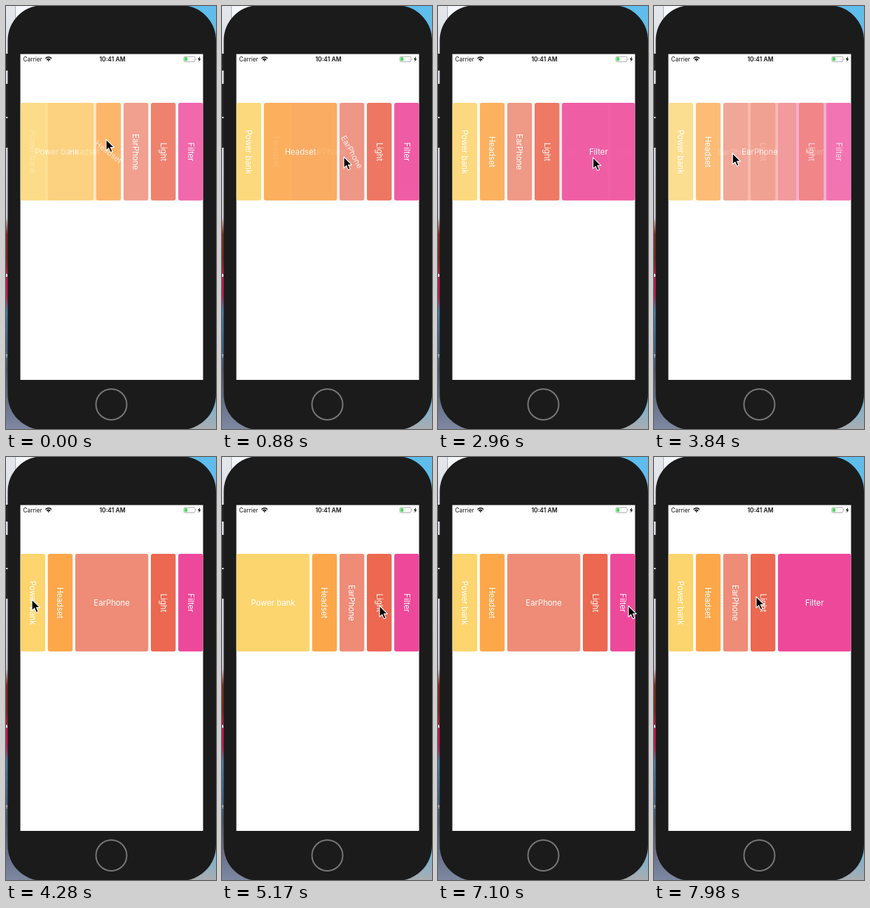
These frames come from a looping animation (300x603 px, 8000 ms). An HTML page:

```html
<!DOCTYPE html>
<html lang="en">
<head>
<meta charset="utf-8">
<title>Expanding cards</title>
<style>
  html, body { margin: 0; width: 100%; height: 100%; overflow: hidden; background: #e6eaf0; }
  svg { display: block; width: 100vw; height: 100vh; }
  text { font-family: Inter, Roboto, sans-serif; }
  .label { font-size: 11.3px; fill: #fff; text-anchor: middle; }
</style>
</head>
<body>
<svg viewBox="0 0 300 603">
  <defs>
    <linearGradient id="edge" x1="0" y1="0" x2="0" y2="1">
      <stop offset="0" stop-color="#e3e7ec"/>
      <stop offset=".5" stop-color="#c9c6d0"/>
      <stop offset=".54" stop-color="#8c2616"/>
      <stop offset=".6" stop-color="#7a2a1c"/>
      <stop offset=".64" stop-color="#c8174f"/>
      <stop offset=".69" stop-color="#b5245c"/>
      <stop offset=".72" stop-color="#3f7fb0"/>
      <stop offset=".79" stop-color="#3a6a98"/>
      <stop offset=".86" stop-color="#4a5568"/>
      <stop offset="1" stop-color="#7f88a2"/>
    </linearGradient>
    <linearGradient id="sky" x1="0" y1="0" x2="0" y2="1">
      <stop offset="0" stop-color="#5fbdec"/>
      <stop offset=".93" stop-color="#6fb4d8"/>
      <stop offset="1" stop-color="#a9adb0"/>
    </linearGradient>
  </defs>

  <!-- desktop behind the phone -->
  <rect width="150" height="603" fill="url(#edge)"/>
  <rect x="14" width="136" height="60" fill="#f3f6fa"/>
  <path d="M13.5 0V40" stroke="#aab0b8"/>
  <rect x="150" width="150" height="603" fill="url(#sky)"/>
  <path d="M0 68h4v24h-4zM0 111h4v47h-4zM0 160h4v42h-4z" fill="#222"/>
  <circle cx="0" cy="384" r="2.2" fill="#fff"/>
  <text x="-2.5" y="501" font-size="8" fill="#fff">e</text>

  <!-- phone -->
  <rect x="2.5" y="-1" width="297.5" height="605" rx="50" fill="#1b1b1b"/>
  <rect x="20.5" y="68.5" width="261" height="464.5" fill="#fff"/>
  <circle cx="150.5" cy="568" r="22" fill="none" stroke="#777" stroke-width="2"/>

  <!-- status bar -->
  <text x="24.5" y="79" font-size="8.3" fill="#111">Carrier</text>
  <text x="152" y="79" font-size="8.5" font-weight="600" text-anchor="middle" fill="#111">10:41 AM</text>
  <g fill="none" stroke="#111" stroke-width="1.5">
    <path d="M56.3 74.7Q60.7 70.8 65.1 74.7M58.1 76.7Q60.7 74.5 63.3 76.7"/>
    <path d="M59.3 77.6Q60.7 76.6 62.1 77.6L60.7 79.2Z" fill="#111" stroke="none"/>
  </g>
  <rect x="254" y="72" width="16" height="7.4" rx="1.8" fill="#fff" stroke="#999" stroke-width=".8"/>
  <rect x="255.1" y="73.1" width="4" height="5.2" rx=".8" fill="#4cd964"/>
  <path d="M271.2 74.4q1.4 1.3 0 2.6z" fill="#999"/>
  <path d="M277.2 71.8l-3.4 4.4h2l-.8 3.6 3.4-4.6h-2z" fill="#111"/>

  <g id="before"></g>
  <g id="after"></g>
  <path id="cursor" d="M0 0V16L3.7 12.6L6.3 18.6L9 17.4L6.4 11.6H11.4Z"
        fill="#000" stroke="#fff" stroke-width="1.1" stroke-linejoin="round"/>
</svg>

<script>
const LOOP = 8000, FADE = 350, TURN = 200;
const LEAVE = 150, GLIDE = 360;   // the pointer moves on this long after a tap
const LEFT = 20.7, TOP = 138, HEIGHT = 139.3, NARROW = 35.4, WIDE = 104.4, GAP = 3.7;

const cards = [
  ["Power bank", "#fcd56f"],
  ["Headset", "#fca74a"],
  ["EarPhone", "#ee8c78"],
  ["Light", "#ec6850"],
  ["Filter", "#ee489a"]
];

const taps = [
  { at: -1000, open: 0, x: 37, y: 203 },
  { at: -110, open: 1, x: 143, y: 190 },
  { at: 805, open: 2, x: 174, y: 215 },
  { at: 1685, open: 3, x: 225, y: 212 },
  { at: 2692, open: 4, x: 258, y: 218 },
  { at: 3650, open: 2, x: 115, y: 210 },
  { at: 4620, open: 0, x: 37, y: 203 },
  { at: 5590, open: 3, x: 225, y: 212 },
  { at: 6510, open: 2, x: 126, y: 211 },
  { at: 7420, open: 4, x: 272, y: 212 },
  { at: 8400, open: 3, x: 146, y: 199 }
];

const $ = id => document.getElementById(id);
const smooth = p => {
  p = Math.min(1, Math.max(0, p));
  return p * p * (3 - 2 * p);
};
const mix = (a, b, k) => a + (b - a) * k;

function add(parent, tag, attrs) {
  const el = document.createElementNS("http://www.w3.org/2000/svg", tag);
  for (const key in attrs) el.setAttribute(key, attrs[key]);
  return parent.appendChild(el);
}

function makeRow(group) {
  return cards.map(([name, color]) => {
    const box = add(group, "rect", { y: TOP, height: HEIGHT, rx: 3, fill: color });
    const label = add(group, "text", { class: "label", y: 4.1 });
    label.textContent = name;
    return { box, label };
  });
}

// The opened card is wide; the turning card rotates its label toward level.
function layRow(row, open, turning, turn) {
  let x = LEFT;
  row.forEach(({ box, label }, i) => {
    const width = i === open ? WIDE : NARROW;
    const angle = i === open ? 0 : i === turning ? 90 * (1 - turn) : 90;
    box.setAttribute("x", x);
    box.setAttribute("width", width);
    label.setAttribute("transform",
      `translate(${x + width / 2} ${TOP + HEIGHT / 2 + 0.3}) rotate(${angle})`);
    x += width + GAP;
  });
}

const before = makeRow($("before")), after = makeRow($("after"));

function draw(t) {
  const step = taps.findLastIndex(tap => tap.at <= t);
  const last = taps[step - 1], tap = taps[step], next = taps[step + 1];
  const age = t - tap.at;
  const fade = smooth(age / FADE), move = smooth((age - LEAVE) / GLIDE);
  layRow(before, last.open, tap.open, smooth(age / TURN));
  layRow(after, tap.open);
  $("before").setAttribute("opacity", 1 - fade);
  $("after").setAttribute("opacity", fade);
  $("cursor").setAttribute("transform",
    `translate(${mix(tap.x, next.x, move)} ${mix(tap.y, next.y, move)})`);
}

const begin = performance.now();
function tick() {
  draw((performance.now() - begin) % LOOP);
  requestAnimationFrame(tick);
}
tick();
</script>
</body>
</html>
```
